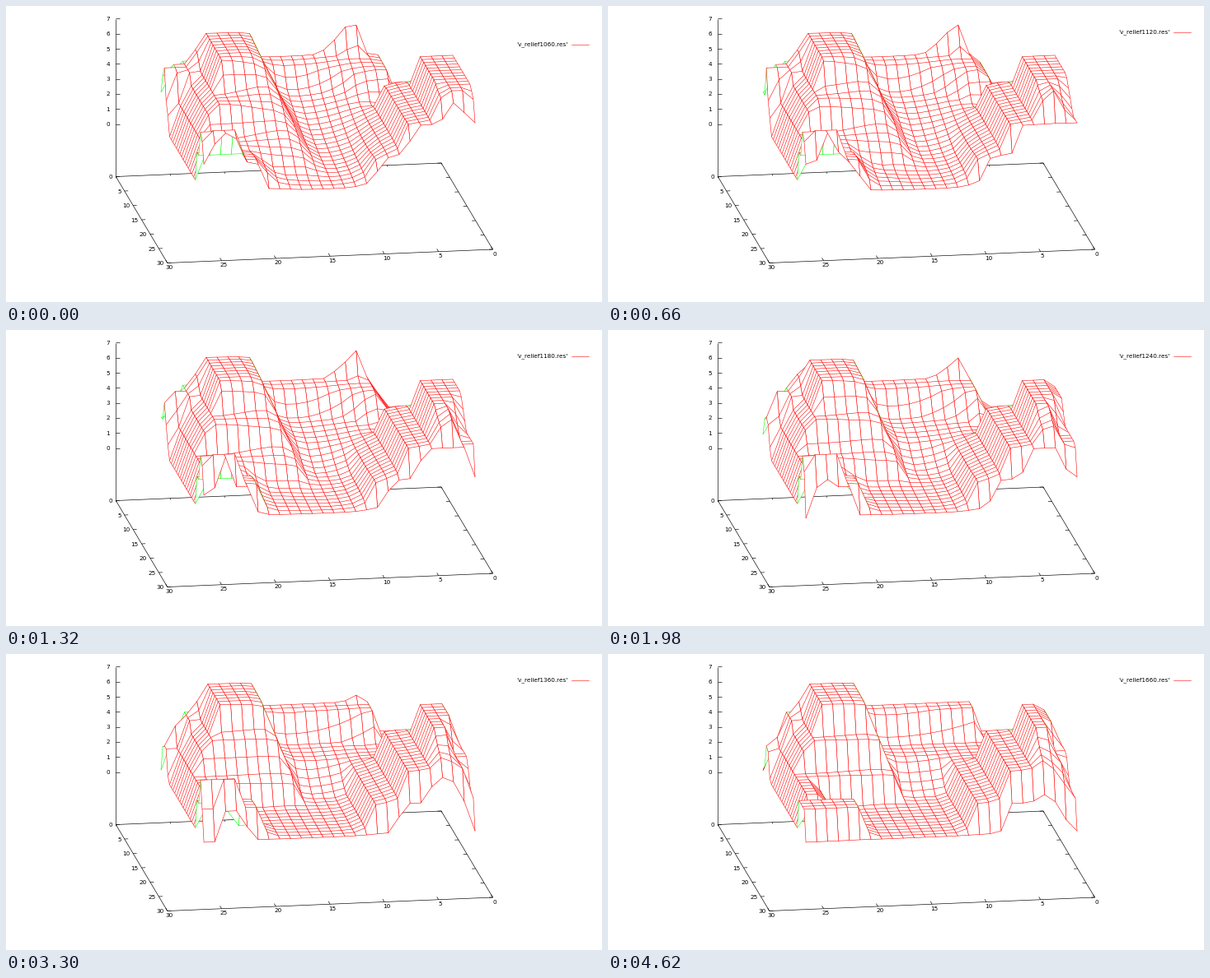
A matplotlib script that plays this animation: 723 px wide and 360 px high, repeating every 4950 ms.

```python
import numpy as np
import matplotlib.pyplot as plt
from matplotlib.animation import FuncAnimation
from matplotlib.collections import LineCollection, PolyCollection

W, H, DPI = 723, 360, 100
FRAMES, INTERVAL = 15, 330
N = 26                      # grid points per side
PX = 72 / DPI               # one pixel in points
RED, GREEN = "#ff0000", "#00ff00"

# U runs from right to left, V from back to front.
U, V = np.meshgrid(np.arange(1.0, N + 1), np.arange(1.0, N + 1))
BOWL = np.exp(-((U - 14) / 6.5) ** 4 - ((V - 15) / 12) ** 4)


def relu(x):
    return np.maximum(x, 0)


def lowest(*parts):
    return np.minimum.reduce(np.broadcast_arrays(*parts))


def highest(*parts):
    return np.maximum.reduce(np.broadcast_arrays(*parts))


def corner(u, v, radius, depth, stretch=1):
    """Cone-shaped loss of height around one corner."""
    return depth * relu(1 - np.hypot(stretch * (U - u), V - v) / radius)


def basin(p):
    """Floor that falls from the back wall and curves up at its sides."""
    slope = 4.6 * np.exp(-(V - 1) / (9 - 2 * p))
    sides = np.minimum((0.03 - 0.025 * p) * (U - 14.5) ** 2, 1)
    right = 2.2 + 1.3 * relu(U - 5 - 0.7 * p)
    left = 0.5 + 0.8 * (N - U)
    return lowest(slope + sides, right, left)


def mountain(p):
    """Pyramid at the back left, with a low flank along the left edge."""
    left = 6.2 - (1.05 + 0.4 * np.clip((V - 3) / 3, 0, 1)) * relu(U - 22)
    right = 6.2 - 1.8 * relu(18 - U)
    front = 6.3 - (0.42 + 0.58 * p) * relu(V - 9.5)
    back = 4.4 - 2 * p + 2 * (V - 1)
    flank = lowest(left, 2.2, 1.3 * (U - 22), 2.2 - (V - 20))
    crest = 2 * (1 - p) * np.exp(-((V - 3) / 1.5) ** 2 - ((U - N) / 1.5) ** 2)
    return highest(lowest(left, right, front, back), flank) + crest


def ridge(p):
    """Staircase on the right, worn down along its outer edge."""
    stairs = np.minimum(8.2 - 0.66 * U, 6.3) - 1.8 * p * relu(1 - (U - 1) / 2)
    wear = corner(1, N, 9, 3.15, stretch=2.5) * (0.35 + 0.65 * p)
    return lowest(stairs, 2.2 + 1.4 * relu(V - 10)) - wear


def bump(p):
    """Small block at the front left."""
    return lowest(0.95 * (U - 19), 0.6 + 0.95 * (V - 21), 4.8 - 2 * p * p)


def terrace(z):
    """Pull heights towards plateaus two units apart."""
    q = (z - 0.2) / 2
    k = np.floor(q)
    return 0.2 + 2 * (k + np.clip((q - k - 0.5) * 3 + 0.5, 0, 1))


def soften(z):
    for _ in range(2):
        p = np.pad(z, 1, mode="edge")
        z = (2 * z + p[:-2, 1:-1] + p[2:, 1:-1] + p[1:-1, :-2] + p[1:-1, 2:]) / 6
    return z


def heights(i):
    p = 1 - (1 - i / (FRAMES - 1)) ** 1.3
    raw = highest(basin(p), mountain(p), ridge(p), bump(p))
    raw = raw - np.where(V == N, 0.4 + 1.6 * p, 0)
    raw = raw - corner(N, N, 2, 2.2) - corner(N, 1, 2, 2 * p)
    raw = np.maximum(raw, 0.2)
    smooth = (1 - 0.8 * p) * BOWL
    return (1 - smooth) * terrace(raw) + smooth * soften(raw)


def floor_point(u, v):
    """Screen position on the base plane."""
    return np.array([528 - 13.157 * u + 2.083 * v, 191 + 0.55 * u + 3.5 * v])


def project(z):
    x, y = floor_point(U, V)
    return np.stack([x, y - 63.7 - 18.29 * z], axis=-1)


def quads(pts):
    """Cells from back to front, open at the front, coloured by visible side."""
    cells = np.stack([pts[1:, :-1], pts[:-1, :-1], pts[:-1, 1:], pts[1:, 1:]], axis=2)
    cells = cells.reshape(-1, 4, 2)
    a, b = cells[:, 2] - cells[:, 0], cells[:, 3] - cells[:, 1]
    facing = a[:, 0] * b[:, 1] - a[:, 1] * b[:, 0] < 0
    return cells, [RED if f else GREEN for f in facing]


fig = plt.figure(figsize=(W / DPI, H / DPI), dpi=DPI, facecolor="white")
ax = fig.add_axes([0, 0, 1, 1])
ax.set_xlim(0, W)
ax.set_ylim(H, 0)
ax.axis("off")


def label(x, y, text, ha):
    return ax.text(x, y, text, ha=ha, va="center_baseline", color="black",
                   family="DejaVu Sans", fontsize=7.3 * PX)


def draw_axes():
    corners = [floor_point(*c) for c in ((30, 0), (30, 30), (0, 30), (0, 0), (30, 0))]
    lines = [corners, [(133, 15.5), (133, 207.5)]]
    along_u, along_v = np.array([4.5, -0.2]), np.array([2.0, 3.4])
    for n in range(0, 31, 5):
        front, back = floor_point(n, 30), floor_point(n, 0)
        left, right = floor_point(30, n), floor_point(0, n)
        lines += [[front, front - along_v], [back, back + along_v / 2],
                  [left, left + along_u], [right, right - along_u]]
        label(front[0] + 2.5, front[1] + 5, str(n), "center")
        label(left[0] - 4, left[1] + 0.3, str(n), "right")
    for n in range(8):
        y = 143.5 - 18.29 * n
        lines.append([(133, y), (137.5, y)])
        label(126, y, str(n), "right")
    ax.add_collection(LineCollection(lines, colors="black", linewidths=0.65 * PX, zorder=1))


draw_axes()
mesh = PolyCollection([], facecolors="white", linewidths=0.55 * PX, zorder=2)
ax.add_collection(mesh)
front_edge, = ax.plot([], [], color=RED, lw=0.55 * PX, zorder=3)
key_text = label(681.3, 46, "", "right")
key_line, = ax.plot([], [], color=RED, lw=0.55 * PX)


def draw(i):
    pts = project(heights(i))
    cells, colors = quads(pts)
    mesh.set_verts(cells, closed=False)
    mesh.set_edgecolor(colors)
    front_edge.set_data(*pts[-1].T)
    step = int(np.interp(i, [0, 10, 12, 14], [1060, 1360, 1480, 1660]))
    y = 31 if i else 46
    key_text.set_text(f"'v_relief{step}.res'")
    key_text.set_y(y)
    key_line.set_data([685.5, 707], [y + 0.5, y + 0.5])
    return mesh, front_edge, key_text, key_line


anim = FuncAnimation(fig, draw, frames=FRAMES, interval=INTERVAL, repeat=True,
                     repeat_delay=0, blit=False)
plt.show()
```
